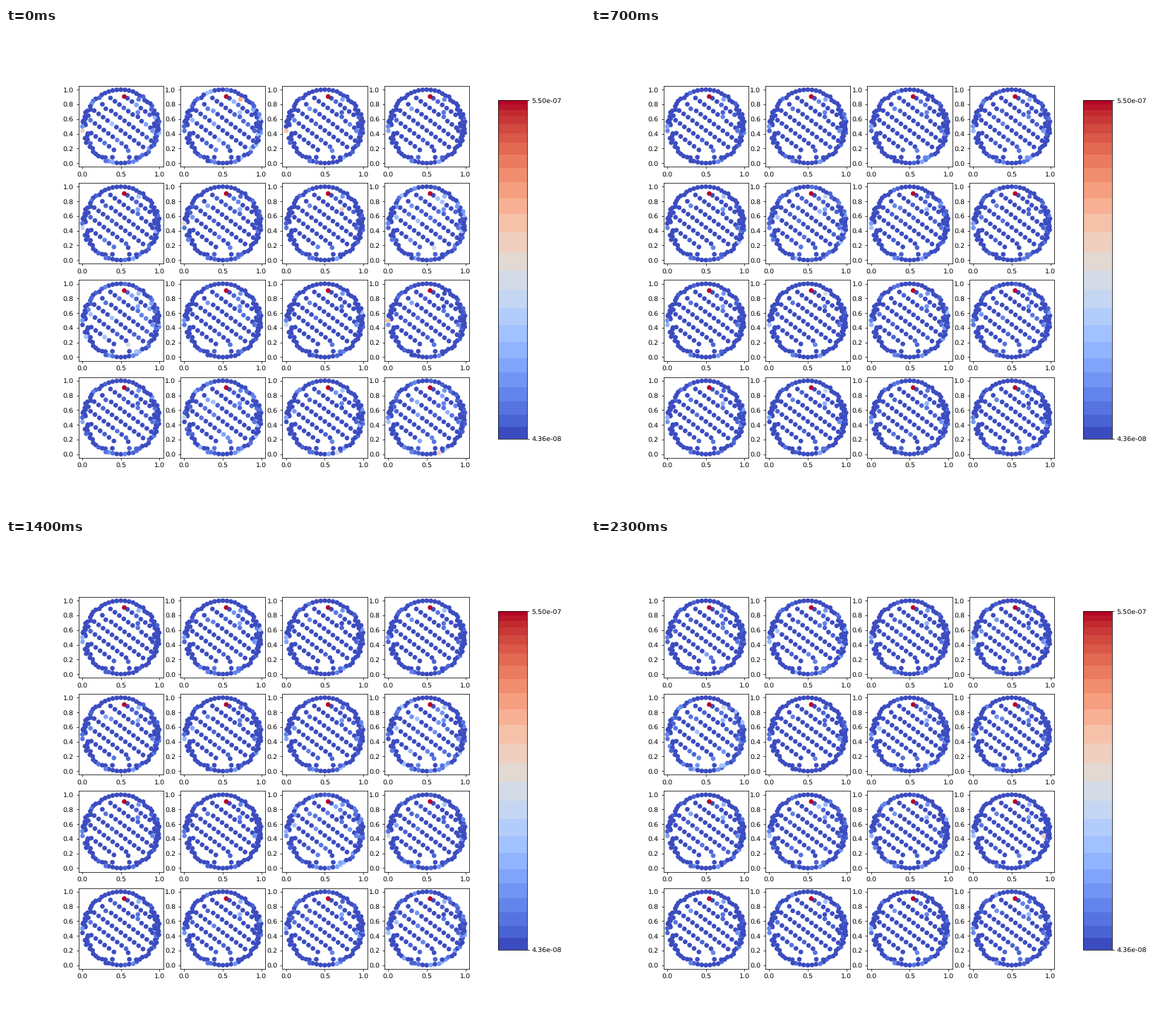
Write a matplotlib script that moves like this. It is 820 px wide and 683 px high and loops after 2400 ms.

```python
import numpy as np
import matplotlib.pyplot as plt
from matplotlib.animation import FuncAnimation
from matplotlib.cm import ScalarMappable
from matplotlib.colors import ListedColormap, Normalize

plt.rcParams["text.hinting"] = "none"

W, H = 820, 683
DPI = W / 12
FRAMES, STEP_MS = 24, 100
LO, HI = 4.36e-8, 5.50e-7
SOURCE = (0.544, 0.906)

# Places that light up most, liveliest first
SPOTS = np.array([(0.73, 0.867), (0.003, 0.44), (0.72, 0.69), (0, 0.50),
                  (0.66, 0.02), (0.305, 0.74), (0.91, 0.44), (0.305, 0.03),
                  (0.595, 0.17), (0.72, 0.63)])
USUAL = np.linspace(0.24, 0.08, len(SPOTS))


def diagonal_rows():
    """Evenly beaded parallel rows inside the disc, in unit coordinates."""
    bead = np.array([0.115, -0.09])
    along = bead / np.hypot(*bead)
    across = np.array([-along[1], along[0]])
    row = 0.265 * across + 0.06 * along
    i, j = np.mgrid[-12:13, -4:5].reshape(2, -1, 1)
    p = np.array([0, -0.11]) + i * bead + j * row
    x, y = p.T
    gap = (y < -0.6) & (abs(x) < 0.55)
    return p[(np.hypot(x, y) < 0.88) & ~gap]


def rim(n=84):
    """Ring of points, crowded at the sides and looser at top and bottom."""
    rng = np.random.default_rng(4)
    t = np.linspace(0, 2 * np.pi, n, endpoint=False)
    t = t - 0.22 * np.sin(2 * t)
    r = 1 - 0.14 * rng.random(n) ** 2 * np.cos(t) ** 2
    return np.column_stack([r * np.cos(t), r * np.sin(t)])


def disc_points():
    foot = [(s * x, y) for s in (-1, 1) for x, y in ((0.22, -0.84), (0.4, -0.85))]
    p = 0.5 + 0.5 * np.vstack([diagonal_rows(), rim(), foot, [(-0.18, -0.64)]])
    taken = np.vstack([SPOTS, SOURCE])
    dist = np.linalg.norm(p[:, None] - taken, axis=2).min(axis=1)
    return np.vstack([p[dist > 0.035], taken])


def banded_map():
    """Coolwarm cut into flat bands, widest in the middle."""
    widths = np.interp(np.arange(25), [0, 8, 12, 24], [18, 27, 30, 6])
    edges = np.concatenate([[0], np.cumsum(widths) / widths.sum()])
    mids = (edges[1:] + edges[:-1]) / 2
    mids[[0, -1]] = 0, 1
    levels = (np.arange(256) + 0.5) / 256
    return ListedColormap(plt.cm.coolwarm(mids[np.searchsorted(edges, levels) - 1]))


points = disc_points()
n_rest = len(points) - len(SPOTS) - 1
weight = np.random.default_rng(11).gamma(0.6, 1.0, n_rest)


def levels_at(step):
    """Relative levels (16 panels x points) for one step."""
    rng = np.random.default_rng([21, step])
    first = step == 0
    gain = rng.uniform(0.3, 1.0, (16, 1))
    gain[rng.random(16) < (0.3 if first else 0.08)] = 2.2
    rest = 0.035 * gain * weight * rng.gamma(1.0, 1.0, (16, n_rest))
    spots = USUAL * rng.uniform(0, 1.4, (16, len(SPOTS)))
    # Now and then one spot of a panel flashes
    for panel in np.flatnonzero(rng.random(16) < (0.6 if first else 0.2)):
        spot = int(len(SPOTS) * rng.random() ** 2)
        spots[panel, spot] = rng.uniform(0.4, 0.7)
    return np.hstack([np.minimum(rest, 0.33), spots, np.ones((16, 1))])


fig, axes = plt.subplots(4, 4, dpi=DPI,
                         figsize=((W + 1e-6) / DPI, (H + 1e-6) / DPI))
fig.subplots_adjust(left=0.125, right=0.8, bottom=0.11, top=0.88,
                    wspace=0.2, hspace=0.2)
cmap, norm = banded_map(), Normalize(LO, HI)

dots = []
for ax in axes.flat:
    dots.append(ax.scatter(*points.T, c=np.full(len(points), LO),
                           cmap=cmap, norm=norm))
    ax.set(xlim=(-0.05, 1.05), ylim=(-0.05, 1.05),
           xticks=[0, 0.5, 1], yticks=np.linspace(0, 1, 6))

bar = fig.colorbar(ScalarMappable(norm, cmap),
                   cax=fig.add_axes([0.85, 0.15, 0.05, 0.7]))
bar.set_ticks([LO, HI], labels=[f"{LO:.2e}", f"{HI:.2e}"])
bar.ax.minorticks_off()


def update(step):
    for dot, level in zip(dots, levels_at(step)):
        dot.set_array(LO + level * (HI - LO))
    return dots


anim = FuncAnimation(fig, update, frames=FRAMES, interval=STEP_MS,
                     repeat=True, repeat_delay=0)
plt.show()
```
